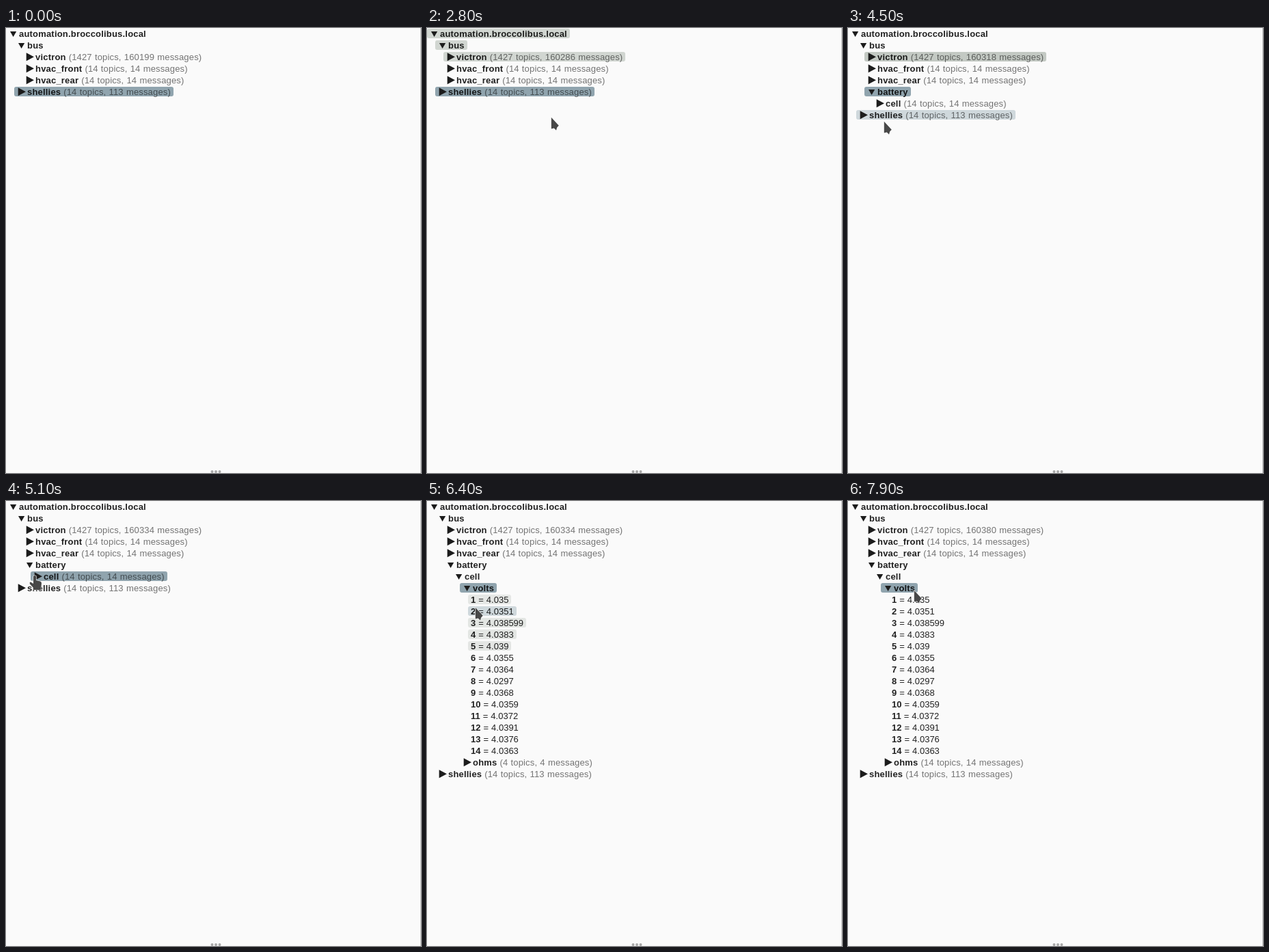
Write an HTML page that moves like this. It is 607x651 px and loops after 8000 ms.

```html
<!DOCTYPE html>
<html lang="en">
<head>
<meta charset="utf-8">
<title>Topic tree</title>
<style>
  html, body { margin: 0; width: 100%; height: 100%; overflow: hidden; background: #fafafa; }
  #stage { position: relative; width: 607px; height: 651px; overflow: hidden; background: #fafafa;
    font: 13px/15px "Liberation Sans", Arial, sans-serif; word-spacing: .4px; color: rgba(0,0,0,.87); }
  .row { position: absolute; height: 14px; padding: 0 4px 0 19px; border-radius: 3px; white-space: pre; }
  .row.leaf { padding-left: 4px; }
  .row svg { position: absolute; left: 0; top: 0; width: 19px; height: 14px; fill: #1c1c1c; }
  .row b { letter-spacing: .19px; }
  .row.leaf b { letter-spacing: 0; }
  .count { letter-spacing: .16px; color: rgba(0,0,0,.54); }
  #edge { position: absolute; left: 606px; top: 0; width: 1px; height: 651px; background: #c4c4c4; }
  #over { position: absolute; left: 0; top: 0; }
  #cursor path { fill: #484848; stroke: #fff; stroke-width: 1.2; stroke-linejoin: round; paint-order: stroke; }
</style>
</head>
<body>
<div id="stage">
  <div id="tree"></div>
  <div id="edge"></div>
  <svg id="over" width="607" height="651">
    <g fill="#a8a8a8"><circle cx="301.5" cy="649" r="2"/><circle cx="307" cy="649" r="2"/><circle cx="312.5" cy="649" r="2"/></g>
    <g id="cursor"><path/></g>
  </svg>
</div>
<script>
const LOOP = 8000, STEP = 100, PITCH = 17, INDENT = 12, FADE = 300;
const ARROW = 'M.8 .8V17.5L4.7 16.4L8 19.7L9.2 15.6L11.8 12.8Z';
const HAND = 'M-2 1.5Q-2 0 0 0Q2 0 2 1.5V7L8 8.5Q10 9 10 11.5L9.5 16V21H-2V18L-7 12.5Q-8 9.5-6 9.5L-2 12Z';
const RIGHT = '<svg><path d="M5.7 1.2L17 7.2L5.7 13.2Z"/></svg>';
const DOWN = '<svg><path d="M6 4H15.2L10.6 12Z"/></svg>';

const volts = [4.035, 4.0351, 4.038599, 4.0383, 4.039, 4.0355, 4.0364,
  4.0297, 4.0368, 4.0359, 4.0372, 4.0391, 4.0376, 4.0363];

// Bursts of messages: time, new total, rows that light up.
const bursts = [
  [0, 160199, []],
  [1300, 160243, ['root', 'bus', 'victron']],
  [2600, 160286, ['root', 'bus', 'victron']],
  [4500, 160318, ['victron']],
  [5000, 160334, []],
  [6700, 160345, ['victron']],
  [7200, 160380, []]
];

// A click selects its row, and the row opens one step later.
const clicks = { battery: 4200, cell: 5100, volts: 6100 };
const opened = (id, t) => t >= clicks[id] + STEP;
const lastBefore = (list, t, time) => list.filter(item => time(item) <= t).pop();

const finger = i => [31 + 11 * i, 92 + PITCH * i];

// Pointer legs: from, to, end point, sideways swing, hand at the end.
const legs = [
  { from: 2000, to: 2000, end: [545, 203] },
  { from: 2000, to: 2800, end: [181, 130] },
  { from: 3000, to: 3900, end: finger(0), hand: true },
  { from: 4200, to: 4900, end: finger(1), swing: 24, hand: true },
  { from: 5200, to: 5900, end: finger(2), swing: 38, hand: true },
  { from: 6200, to: 6800, end: [118, 238] },
  { from: 6800, to: 7000, end: [236, 366] },
  { from: 7400, to: 7900, end: [96, 130] }
];

const tree = document.getElementById('tree');
const cursor = document.getElementById('cursor');
const shape = cursor.firstElementChild;

const many = (n, word) => `${n} ${word}${n === 1 ? '' : 's'}`;
const count = (topics, messages = topics) => `(${many(topics, 'topic')}, ${many(messages, 'message')})`;
const ease = k => k * k * (3 - 2 * k);

function pulse(age, peak) {
  return age < 0 || age >= FADE ? 0 : peak * Math.sqrt(1 - (age / FADE) ** 2);
}

function listRows(t) {
  const rows = [];
  const add = (id, level, info, label = id) => rows.push({ id, level, info, label });
  const parent = (id, level, n) => add(id, level, opened(id, t) ? '' : count(n));
  const total = lastBefore(bursts, t, b => b[0])[1];
  const ohms = t < 7200 ? Math.min(6, 1 + Math.floor((t - 5900) / 160)) : 14;

  add('root', 0, '', 'automation.broccolibus.local');
  add('bus', 1, '');
  add('victron', 2, count(1427, total));
  add('hvac_front', 2, count(14));
  add('hvac_rear', 2, count(14));
  if (t >= 2900) parent('battery', 2, 13);
  if (opened('battery', t)) parent('cell', 3, 14);
  if (opened('cell', t)) parent('volts', 4, 14);
  if (opened('volts', t)) volts.forEach((value, i) => rows.push({ id: i, level: 5, label: i + 1, value }));
  if (t >= 5900) add('ohms', 4, count(ohms));
  add('shellies', 1, count(14, 113));
  return rows;
}

function glow(row, t) {
  if (row.value) return pulse(t - 6290 - 26 * row.id, .25);
  if (['root', 'bus', 'battery', 'ohms'].includes(row.id) && t >= 5900 && t < 6200) return pulse(t - 5900, .28);
  const burst = lastBefore(bursts, t, b => b[0]);
  return burst[2].includes(row.id) ? pulse(t - burst[0], .6) : 0;
}

function pointer(t) {
  const leg = lastBefore(legs, t, l => l.from);
  if (!leg) return null;
  const prev = legs[legs.indexOf(leg) - 1] || leg;
  const k = t >= leg.to ? 1 : (t - leg.from) / (leg.to - leg.from);
  const bulge = (leg.swing || 0) * Math.sin(Math.PI * k);
  const mix = n => prev.end[n] + (leg.end[n] - prev.end[n]) * ease(k);
  const hand = k > .8 ? leg.hand : k === 0 && prev.hand;
  return { x: Math.round(mix(0) + bulge * .7), y: Math.round(mix(1) + bulge * 1.6), hand };
}

function backdrop(row, i, t, tip) {
  const selected = lastBefore(Object.keys(clicks), t, id => clicks[id]) || 'shellies';
  if (row.id === selected) return '#90a4ae';
  const under = tip && tip.x < 130 && tip.x >= row.level * INDENT && i === Math.floor((tip.y - 1) / PITCH);
  return under ? '#cfd8dc' : `rgba(158,168,158,${glow(row, t)})`;
}

function rowHtml(row, i, t, tip) {
  const icon = row.value ? '' : row.info ? RIGHT : DOWN;
  const tail = row.value ? ` = ${row.value}` : row.info && ` <span class="count">${row.info}</span>`;
  return `<div class="row${row.value ? ' leaf' : ''}" style="left:${row.level * INDENT}px;top:${1 + i * PITCH}px;` +
    `background:${backdrop(row, i, t, tip)}">${icon}<b>${row.label}</b>${tail}</div>`;
}

let shown = -1;
function draw(now) {
  const t = Math.floor(now % LOOP / STEP) * STEP;
  if (t === shown) return;
  shown = t;
  const tip = pointer(t);
  tree.innerHTML = listRows(t).map((row, i) => rowHtml(row, i, t, tip)).join('');
  cursor.style.display = tip ? '' : 'none';
  if (tip) {
    cursor.setAttribute('transform', `translate(${tip.x} ${tip.y})`);
    shape.setAttribute('d', tip.hand ? HAND : ARROW);
  }
}

const start = performance.now();
function tick() {
  draw(performance.now() - start);
  requestAnimationFrame(tick);
}
tick();
</script>
</body>
</html>
```
